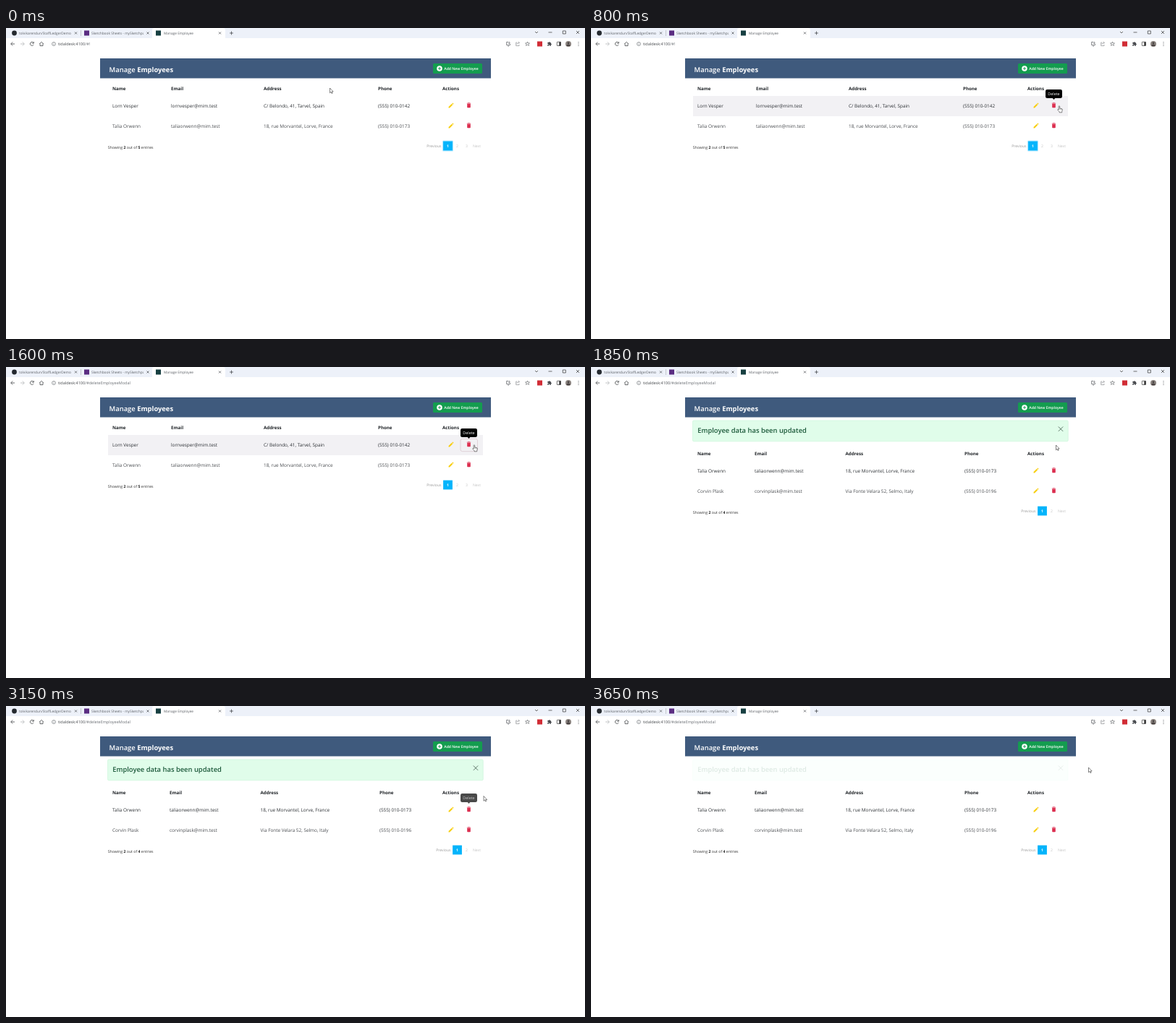
Recreate the animation shown at these times as an HTML page with a canvas. Size 800 px wide and 430 px high, loop 4100 ms.

```html
<!DOCTYPE html>
<html lang="en">
<head>
<meta charset="utf-8">
<title>Manage Employee</title>
<style>
  html, body { margin: 0; width: 100%; height: 100%; overflow: hidden; background: #fff; }
  canvas { display: block; width: 800px; height: 430px; }
</style>
</head>
<body>
<canvas id="stage"></canvas>
<script>
const LOOP = 4100, STEP = 50;
const PRESS = 1450, URL_CHANGE = 1600, UPDATE = 1650;
const canvas = document.getElementById('stage');
const ctx = canvas.getContext('2d');
const ratio = window.devicePixelRatio || 1;
canvas.width = 800 * ratio;
canvas.height = 430 * ratio;

const PENCIL = new Path2D('M3 17.25V21h3.75L17.81 9.94l-3.75-3.75L3 17.25zM20.71 7.04c.39-.39.39-1.02 0-1.41l-2.34-2.34c-.39-.39-1.02-.39-1.41 0l-1.83 1.83 3.75 3.75 1.83-1.83z');
const TRASH = new Path2D('M6 19c0 1.1.9 2 2 2h8c1.1 0 2-.9 2-2V7H6v12zM19 4h-3.5l-1-1h-5l-1 1H5v2h14V4z');
const PUZZLE = new Path2D('M20 11h-1V7a2 2 0 0 0-2-2h-4V4a2.5 2.5 0 0 0-5 0v1H4a2 2 0 0 0-2 2v4h2a2.5 2.5 0 0 1 0 5H2v4a2 2 0 0 0 2 2h4v-2a2.5 2.5 0 0 1 5 0v2h4a2 2 0 0 0 2-2v-4h1a2.5 2.5 0 0 0 0-5z');
const ARROW = new Path2D('M0 0V6.8L1.6 5.3 2.6 7.6 3.6 7.1 2.7 5H4.7z');
const HAND = new Path2D('M.2.7Q1 -.5 1.7.7V3.5L4.6 4.2Q5.4 4.5 5.3 5.5L4.7 8V9.3H1.2V8.4L-1.2 5.7Q-1.1 4.6 0 5.2L.2 5.5z');

// Pointer position: time, x, y
const POINTER = [
  [0, 447.5, 83], [450, 447.5, 83], [500, 452, 84], [600, 520, 94], [700, 625, 107],
  [800, 646, 107.5], [1650, 646, 107.5], [1850, 642.5, 108], [2000, 642.5, 108],
  [2200, 644, 138], [2950, 644, 138], [3150, 660, 124.5], [3250, 672, 105],
  [3350, 672, 105], [3650, 687.5, 85], [LOOP, 687.5, 85]
];

const LORN = ['Lorn Vesper', 'lornvesper@mim.test', 'C/ Belondo, 41, Tarvel, Spain', '(555) 010-0142'];
const TALIA = ['Talia Orwenn', 'taliaorwenn@mim.test', '18, rue Morvantel, Lorve, France', '(555) 010-0173'];
const CORVIN = ['Corvin Plask', 'corvinplask@mim.test', 'Via Fonte Velara 52, Selmo, Italy', '(555) 010-0196'];
const HEADINGS = ['Name', 'Email', 'Address', 'Phone', 'Actions'];
const BEFORE = { top: 94, cols: [147, 228, 356, 514, 603], rows: [LORN, TALIA], total: 5, pages: 3 };
const AFTER = { top: 130, cols: [147, 226, 351.5, 516, 603], rows: [TALIA, CORVIN], total: 4, pages: 2 };

const ramp = (t, a, b) => Math.min(1, Math.max(0, (t - a) / (b - a)));

function pointerAt(t) {
  const i = Math.max(1, POINTER.findIndex(p => p[0] >= t));
  const [t0, x0, y0] = POINTER[i - 1], [t1, x1, y1] = POINTER[i];
  const k = ramp(t, t0, t1);
  return { x: x0 + (x1 - x0) * k, y: y0 + (y1 - y0) * k };
}

function text(str, x, y, size, color = '#212529', weight = 400, align = 'left') {
  ctx.font = `${weight} ${size}px "Open Sans", "Noto Sans", sans-serif`;
  ctx.textAlign = align;
  ctx.fillStyle = color;
  ctx.fillText(str, x, y);
  return x + ctx.measureText(str).width;
}

function rect(x, y, w, h, color) {
  ctx.fillStyle = color;
  ctx.fillRect(x, y, w, h);
}

function box(x, y, w, h, r, fill, stroke, width = 0.8) {
  ctx.beginPath();
  ctx.roundRect(x, y, w, h, r);
  if (fill) { ctx.fillStyle = fill; ctx.fill(); }
  if (stroke) { ctx.strokeStyle = stroke; ctx.lineWidth = width; ctx.stroke(); }
}

function disc(x, y, r, color) {
  ctx.beginPath();
  ctx.arc(x, y, r, 0, Math.PI * 2);
  ctx.fillStyle = color;
  ctx.fill();
}

function line(path, color = '#454749', width = 0.8) {
  ctx.strokeStyle = color;
  ctx.lineWidth = width;
  ctx.stroke(new Path2D(path));
}

function cross(x, y, r, color, width) {
  line(`M${x - r} ${y - r}L${x + r} ${y + r}M${x + r} ${y - r}L${x - r} ${y + r}`, color, width);
}

function plus(x, y, r, color, width) {
  line(`M${x - r} ${y}H${x + r}M${x} ${y - r}V${y + r}`, color, width);
}

function icon(path, cx, cy, color, scale = 0.385) {
  ctx.save();
  ctx.translate(cx - 12 * scale, cy - 12 * scale);
  ctx.scale(scale, scale);
  ctx.fillStyle = color;
  ctx.fill(path);
  ctx.restore();
}

function faded(alpha, draw) {
  if (alpha <= 0) return;
  ctx.save();
  ctx.globalAlpha = alpha;
  draw();
  ctx.restore();
}

function tabTitle(str, x, width) {
  ctx.save();
  ctx.beginPath();
  ctx.rect(x, 0, width, 14);
  ctx.clip();
  text(str, x, 8.9, 4.8, '#5c6066');
  ctx.restore();
}

function drawTabs() {
  rect(0, 0, 800, 14, '#edf1f9');
  box(202, 0, 101, 15, [3, 3, 0, 0], '#fff');
  disc(11.5, 7, 3.4, '#24292f');
  rect(108, 3.5, 7, 7, '#5b2d82');
  rect(207, 3.5, 7, 7, '#173f41');
  tabTitle('tolvikarendun/StaffLedgerDemo', 18, 73);
  tabTitle('Sketchbook Sheets - mySketchpad Base', 118, 72);
  tabTitle('Manage Employee', 218, 72);
  line('M103.5 3V11', '#9a9da2', 0.5);
  for (const x of [96.5, 196, 295.5]) cross(x, 7, 1.5, '#45484c', 0.7);
  plus(311.5, 7, 2.4, '#45484c', 0.8);
  line('M731 5L733 7L735 5M749.5 6H754.5M769.3 4H773.3V8H769.3Z', '#333', 0.7);
  cross(790, 6, 2, '#333', 0.7);
}

function drawToolbar(t) {
  rect(0, 14, 800, 16, '#fff');
  line('M12 22H6.8M9.2 19.4L6.7 22L9.2 24.5');
  line('M20 22H25.2M22.8 19.4L25.3 22L22.8 24.5', '#b4b6b9');
  line('M37.8 20.3A2.5 2.5 0 1 0 38.1 23M38.3 19V21.2H36.2');
  line('M46.2 22L49 19.2L51.8 22M47 21.5V24.6H51V21.5');
  line('M68.5 22A2.5 2.5 0 1 1 63.5 22A2.5 2.5 0 1 1 68.5 22M66 21.7V23.4M66 20.4V21', '#5f6368', 0.6);
  const end = text('tidaldesk:4100', 72, 24, 5.5, '#44474b');
  text(t >= URL_CHANGE ? '/#deleteEmployeeModal' : '/#!', end, 24, 5.5, '#6b6f74');

  line('M694 19.4H691.6V23.6H696.5V22M695.3 18.8V21.6M694 20.5L695.3 21.8L696.6 20.5M693 25H695.2', '#55585c', 0.7);
  line('M706 20H704.7V24.6H709V23M705.8 22.5Q706.2 20.6 708.5 20.4M707.8 18.9L709.6 20.4L707.8 21.9', '#777a7e', 0.6);
  line('M720.5 19L721.4 21H723.5L721.9 22.3L722.5 24.4L720.5 23.2L718.5 24.4L719.1 22.3L717.5 21H719.6Z', '#55585c', 0.6);
  rect(734, 18.5, 7, 7, '#d12d36');
  icon(PUZZLE, 751, 22, '#494c50', 0.28);
  box(761.3, 19.3, 5.2, 5.2, 0.4, null, '#333', 0.7);
  rect(764.3, 19.3, 2.2, 5.2, '#333');
  disc(777, 22, 4, '#8c8581');
  disc(777, 20.8, 1.4, '#484242');
  ctx.beginPath();
  ctx.arc(777, 25, 2.6, Math.PI, 0);
  ctx.fillStyle = '#484242';
  ctx.fill();
  for (const y of [19.8, 22, 24.2]) disc(791, y, 0.55, '#45484c');
}

function drawHeader() {
  rect(130, 42, 540, 27.5, '#3f5a7d');
  const end = text('Manage ', 142.6, 61, 9.4, '#fff', 600);
  text('Employees', end, 61, 9.4, '#fff', 700);
  box(590, 49, 68, 14, 1.5, '#149c4f');
  disc(599, 56, 3.8, '#fff');
  plus(599, 56, 2, '#149c4f', 0.9);
  text('Add New Employee', 605.3, 58.1, 5.1, '#fff', 600);
}

function drawAlert() {
  box(140.5, 74, 518.7, 28.8, 1.5, '#e0fdea', '#cdf6dc', 0.7);
  text('Employee data has been updated', 147.2, 90.7, 9.4, '#1d5a3b', 600);
  cross(649, 85.7, 3.2, '#40584b', 0.8);
}

function drawPager(table, y, ring) {
  const first = 648.5 - 13 * table.pages;
  const left = first - 5.4;
  text('Previous', first - 8, y + 2, 5.1, '#999', 400, 'right');
  if (ring) box(left - 1.2, y - 7.6, 15.2, 15.2, 1.5, '#b5e9ff');
  rect(left, y - 6.4, 12.8, 12.8, '#03b4fb');
  for (let page = 1; page <= table.pages; page++) {
    const active = page === 1;
    text(String(page), first + 1 + 13 * (page - 1), y + 2, 5.1, active ? '#fff' : '#c4c4c4', active ? 700 : 400, 'center');
  }
  text('Next', 645, y + 2, 5.1, '#c4c4c4');
}

function drawTable(table, t, pointer) {
  const { top, cols, rows, total } = table;
  HEADINGS.forEach((label, i) => text(label, cols[i], top - 7.7, 6.2, '#212529', 700));
  rows.forEach((row, i) => {
    const y = top + 28 * i;
    const hovered = pointer.x > 141 && pointer.x < 659 && pointer.y >= y && pointer.y < y + 28;
    if (hovered) rect(141, y, 518, 28, '#f2f1f4');
    const color = i ? '#4a4d51' : '#2c3034';
    row.forEach((cell, c) => text(cell, cols[c], y + 16.3, 6.4, color));
    icon(PENCIL, 615, y + 13, '#f8cf12');
    icon(TRASH, 639.5, y + 12.8, '#dc2f50');
  });
  const y = top + 73;
  let x = text('Showing ', 140.7, y, 5.2, '#333');
  x = text('2', x, y, 5.2, '#222', 700);
  x = text(' out of ', x, y, 5.2, '#333');
  x = text(String(total), x, y, 5.2, '#222', 700);
  text(' entries', x, y, 5.2, '#333');
  drawPager(table, top + 69, t < PRESS);
}

function drawTooltip(top) {
  box(628, top, 23, 12, 2.3, '#000');
  ctx.fill(new Path2D(`M637.7 ${top + 12}H641.3L639.5 ${top + 14}Z`));
  text('Delete', 639.5, top + 7.9, 5.4, '#fff', 400, 'center');
}

function drawPointer({ x, y }, top) {
  const overButton = x >= 603 && x <= 652 && y >= top + 5 && y <= top + 51;
  ctx.save();
  ctx.translate(x, y);
  ctx.lineJoin = 'round';
  ctx.lineWidth = 0.6;
  ctx.fillStyle = '#fff';
  ctx.strokeStyle = '#333';
  const shape = overButton ? HAND : ARROW;
  ctx.fill(shape);
  ctx.stroke(shape);
  if (overButton) line('M1.7 3.8V5.4M3 4.1V5.5M4.2 4.4V5.6', '#444', 0.4);
  ctx.restore();
}

function draw(t) {
  const table = t < UPDATE ? BEFORE : AFTER;
  const pointer = pointerAt(t);
  ctx.setTransform(ratio, 0, 0, ratio, 0, 0);
  ctx.textRendering = 'geometricPrecision';
  rect(0, 0, 800, 430, '#fff');
  drawTabs();
  drawToolbar(t);
  drawHeader();
  drawTable(table, t, pointer);
  if (t < UPDATE) {
    faded(ramp(t, PRESS - 50, PRESS + 50), () => box(628, 99.3, 23.5, 17.4, 2.5, null, '#d8c3ca', 0.7));
    faded(ramp(t, 650, 800), () => drawTooltip(85));
  } else {
    faded(ramp(t, 1600, 1750) * (1 - 0.87 * ramp(t, 3450, 3650)), drawAlert);
    faded(ramp(t, 2050, 2200) * (1 - ramp(t, 3110, 3250)), () => drawTooltip(121));
  }
  drawPointer(pointer, table.top);
}

function tick() {
  const t = performance.now() % LOOP;
  draw(Math.floor(t / STEP) * STEP);
  requestAnimationFrame(tick);
}
tick();
</script>
</body>
</html>
```
